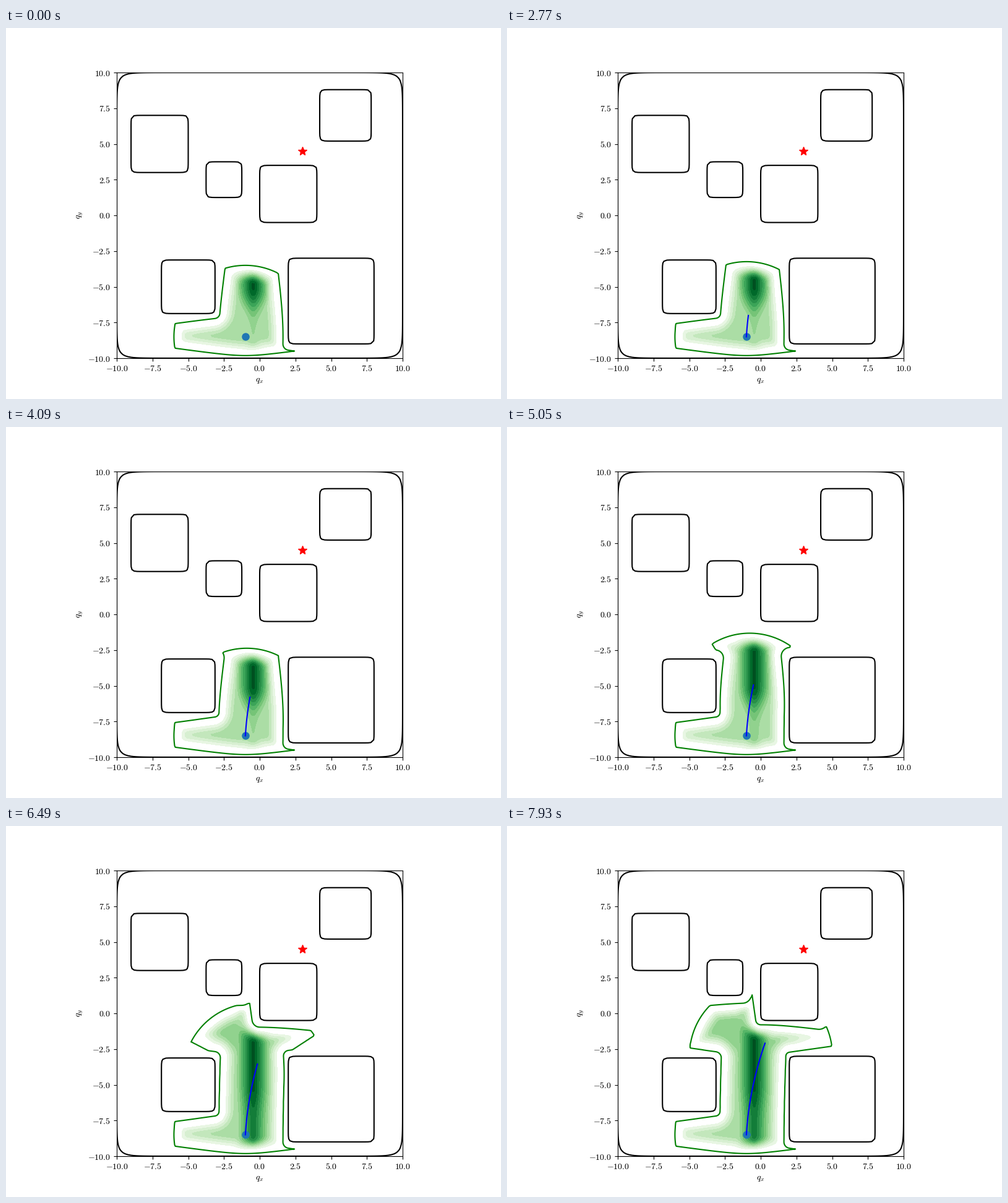
These frames come from a looping animation (800 px wide and 600 px high, 7990 ms). A matplotlib script:

```python
import numpy as np
import matplotlib.pyplot as plt
from matplotlib.animation import FuncAnimation

plt.rcParams["mathtext.fontset"] = "cm"

LOOP, STEP = 7990, 34
START = np.array([-1, -8.5])
GOAL = (3, 4.5)
RANGE = 5                # sensing radius
SPEED, RAMP = 9.74e-4, 1950
MAP_LAG = 700            # the map trails the robot by this many ms
UPDATES = [0, 1740, 3040, 4240, 5420, 6370, 6760, 7750]
BOXES = [(-7, 5, 2), (6, 7, 1.8), (-2.5, 2.5, 1.25),
         (2, 1.5, 2), (-5, -5, 1.875), (5, -6, 3)]

GX, GY = np.meshgrid(np.linspace(-7, 7, 141), np.linspace(-10, 3, 131))


# ---- robot motion ----
def climb(t):
    """Height gained: smooth start, then constant speed."""
    return SPEED * RAMP * np.log(np.cosh(max(t, 0) / RAMP))


def path(rise):
    return START[0] + .057 * rise + .0228 * rise ** 2, START[1] + rise


# ---- mapped free space ----
def clearance(x, y):
    """Distance to the nearest box or outer wall, negative inside a box."""
    c = 10 - np.maximum(np.abs(x), np.abs(y))
    for cx, cy, h in BOXES:
        dx, dy = np.abs(x - cx) - h, np.abs(y - cy) - h
        gap = np.hypot(np.maximum(dx, 0), np.maximum(dy, 0))
        c = np.minimum(c, gap + np.minimum(np.maximum(dx, dy), 0))
    return c


def seen_from(px, py):
    """Positive where a point is in range and in sight, with growing margins."""
    dx, dy = GX - px, GY - py
    dist = np.hypot(dx, dy)
    v = np.minimum(RANGE - dist, clearance(GX, GY) - .14 * dist)
    for s in np.linspace(0, 1, 40):
        v = np.minimum(v, clearance(px + s * dx, py + s * dy) - .08 * s * dist)
    return v


def blur(f, passes=3):
    for _ in range(passes):
        for axis in (0, 1):
            f = (np.roll(f, 1, axis) + 2 * f + np.roll(f, -1, axis)) / 4
    return f


def shade(free, py):
    """A dark spine along the corridor over paler side pockets."""
    u = np.clip((py + 6.6) / 1.4, 0, 1)
    low = .4 + .45 * u * u * (3 - 2 * u)
    along = low + (1 - low) * np.exp(-(np.minimum(GY + 5, 0) / 1.5) ** 2)
    across = np.clip(1 - np.abs(GX + .45) / 1.75, 0, 1)
    spine = along * across * np.clip((free - .3) / .8, 0, 1)
    side = np.interp(GY, [-3, -2], [.42, .52]) * np.clip(free - .4, 0, .8)
    return blur(np.maximum(spine, side))


# ---- fixed scene ----
fig, ax = plt.subplots(figsize=(8, 6), dpi=100)
ax.set_aspect("equal")

bx, by = np.meshgrid(np.linspace(-10, 10, 100), np.linspace(-10, 10, 100))
for cx, cy, h, sharp in [(*b, 8) for b in BOXES] + [(0, 0, 10, 2.1)]:
    f = np.logaddexp(sharp * (np.abs(bx - cx) - h), sharp * (np.abs(by - cy) - h))
    ax.contour(bx, by, f / sharp, levels=[0], colors="k", linewidths=1.5)

ticks = np.linspace(-10, 10, 9)
labels = [f"${v:.1f}$" for v in ticks]
ax.set_xticks(ticks, labels)
ax.set_yticks(ticks, labels)
ax.set_xlabel("$q_x$")
ax.set_ylabel("$q_y$")

# ---- one group of artists per map update ----
groups = []
free = np.full(GX.shape, -1.0)
for t in UPDATES:
    pose = path(climb(t - MAP_LAG))
    free = np.maximum(free, seen_from(*pose))
    fill = ax.contourf(GX, GY, shade(free, pose[1]), levels=np.linspace(.07, 1, 13),
                       cmap="Greens", vmin=0, vmax=1, extend="max", zorder=1)
    edge = ax.contour(GX, GY, free, levels=[0], colors="green", linewidths=1.5, zorder=2)
    groups.append((fill, edge))

ax.plot(*START, "o", color="C0", ms=8, zorder=3)
ax.plot(*GOAL, "r*", ms=10, zorder=3)
trail, = ax.plot([], [], "b", lw=1.5, zorder=4)
ax.set_xlim(-10, 10)
ax.set_ylim(-10, 10)


def draw(i):
    # the picture holds for 130 ms, then changes every 60 ms
    t = i * STEP + STEP / 2
    t = 0 if t < 130 else 130 + (t - 130) // 60 * 60
    current = np.searchsorted(UPDATES, t, side="right") - 1
    for k, group in enumerate(groups):
        for artist in group:
            artist.set_visible(k == current)
    trail.set_data(*path(np.linspace(0, climb(t), 40)))
    trail.set_visible(t > 0)
    return [trail]


anim = FuncAnimation(fig, draw, frames=LOOP // STEP, interval=STEP,
                     repeat=True, repeat_delay=0, blit=False)
plt.show()
```
